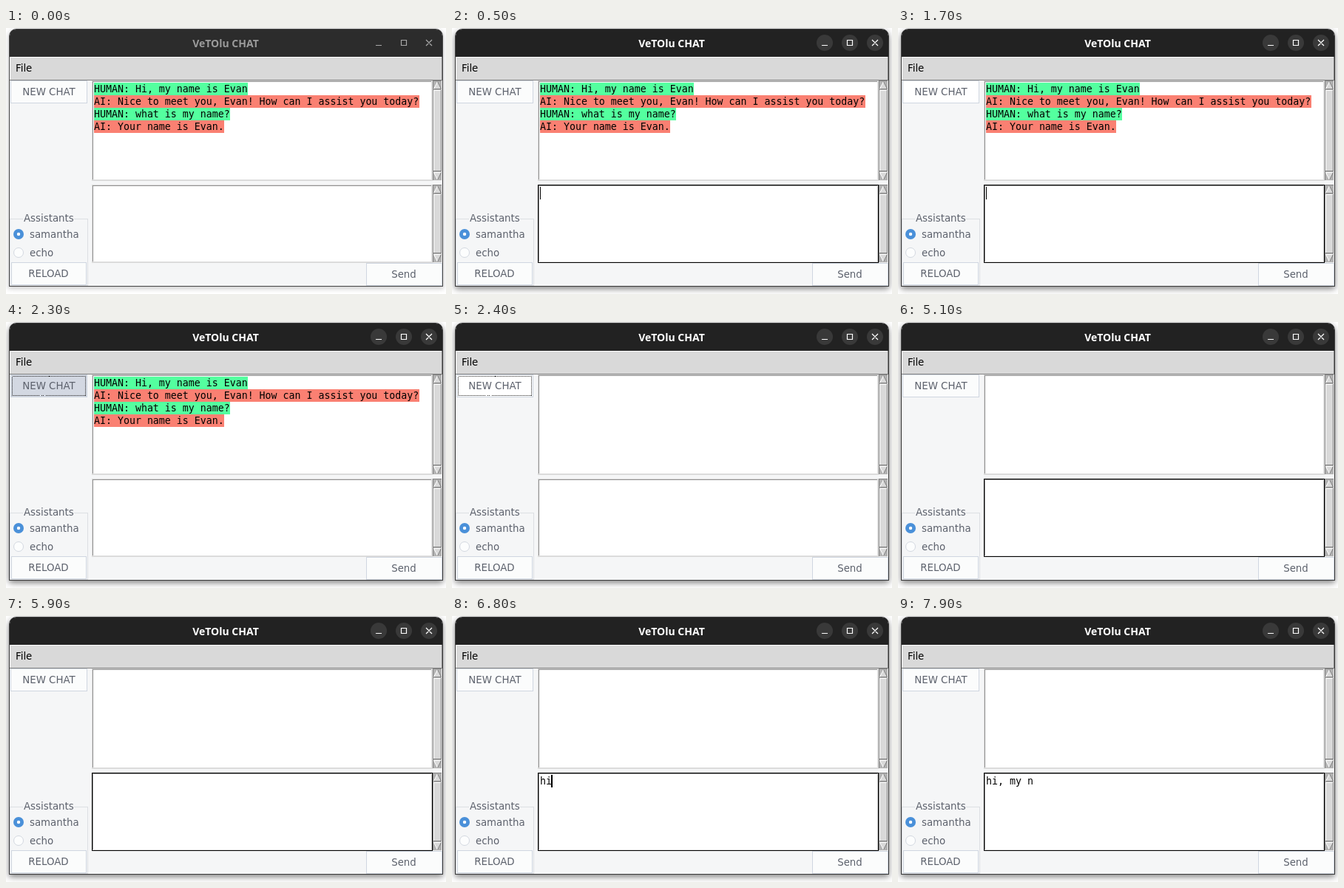
Write an HTML page that moves like this. It is 595 by 360 pixels and loops after 8000 ms.

```html
<!DOCTYPE html>
<html lang="en">
<head>
<meta charset="utf-8">
<title>Chat window</title>
<style>
  html, body { margin: 0; width: 100%; height: 100%; overflow: hidden; background: #fff; }
  #shadow { position: absolute; left: 5px; top: 2px; width: 585px; height: 347px; border-radius: 9px 9px 0 0;
    box-shadow: 0 0 0 1px #3a3a3a, 0 3px 9px 1px rgba(0,0,0,.5); }
  .idle #shadow { box-shadow: 0 0 0 1px #454545, 0 2px 6px 2px rgba(0,0,0,.2); }
  svg { position: absolute; left: 0; top: 0; display: block; }
  rect { shape-rendering: crispEdges; }
  text { font: 13.33px "DejaVu Sans", sans-serif; fill: #5c616c; white-space: pre; }
  .mono { font: 13.289px "DejaVu Sans Mono", monospace; fill: #000; }
  .mid { text-anchor: middle; }
  #bar { fill: #222; }
  #title { font: bold 14px "Noto Sans", "Open Sans", sans-serif; fill: #fff; }
  .disc { fill: #393939; }
  .icon { fill: none; stroke: #fff; stroke-width: 1.2; }
  .idle #bar { fill: #2c2c2c; }
  .idle #title { fill: #9b9b9b; }
  .idle .disc { fill: none; }
  .idle .icon { stroke: #a8a8a8; }
  .btn { fill: #fbfcfc; stroke: #cfd6e0; }
</style>
</head>
<body>
<div id="shadow"></div>
<svg id="stage" width="595" height="360" viewBox="0 0 595 360"></svg>
<script>
const LOOP = 8000, COL = 8, LINE = 17, LEFT = 119;
const $ = id => document.getElementById(id);

const rect = (x, y, w, h, fill, more = '') =>
  `<rect x="${x}" y="${y}" width="${w}" height="${h}" fill="${fill}" ${more}/>`;
const text = (x, y, str, more = '') => `<text x="${x}" y="${y}" ${more}>${str}</text>`;
const path = (d, more) => `<path d="${d}" ${more}/>`;

const button = (x, y, w, h, label, cx, base, id) =>
  `<rect id="${id}" class="btn" x="${x + .5}" y="${y + .5}" width="${w - 1}" height="${h - 1}" rx="1"/>` +
  text(cx, base, label, 'class="mid"');

// box with a bevel: light and dark edges around a fill
const bevel = (x, y, w, h, fill, topLeft, bottomRight) =>
  rect(x, y, w, h, bottomRight) + rect(x, y, w - 1, h - 1, topLeft) + rect(x + 1, y + 1, w - 2, h - 2, fill);

const textBox = (y, h, id) =>
  rect(116, y, 461, h, '#d9d9d9', `id="${id}"`) + bevel(117, y + 1, 459, h - 2, '#fff', '#929292', '#dedede');

function scrollbar(y, h) {
  const end = y + h;
  return bevel(577, y, 13, h, '#b3b3b3', '#828282', '#eee') +
    path(`M583.5 ${y + 1.5}L578.5 ${y + 11.5}H588.5Z`, 'fill="#d9d9d9"') +
    path(`M583.5 ${y + 1.5}L578.5 ${y + 11.5}`, 'stroke="#fff"') +
    path(`M578.5 ${y + 11.5}H588.5L583.5 ${y + 1.5}`, 'fill="none" stroke="#828282"') +
    bevel(578, y + 13, 11, h - 26, '#d9d9d9', '#fff', '#828282') +
    path(`M578.5 ${end - 11.5}H588.5L583.5 ${end - 1.5}Z`, 'fill="#d9d9d9"') +
    path(`M583.5 ${end - 1.5}L578.5 ${end - 11.5}H588.5`, 'fill="none" stroke="#fff"') +
    path(`M588.5 ${end - 11.5}L583.5 ${end - 1.5}`, 'stroke="#828282"');
}

const chat = [
  'HUMAN: Hi, my name is Evan',
  'AI: Nice to meet you, Evan! How can I assist you today?',
  'HUMAN: what is my name?',
  'AI: Your name is Evan.'
].map((str, i) => {
  const y = 74 + i * LINE;
  return rect(LEFT, y, str.length * COL, LINE, str[0] === 'H' ? '#54ff9f' : '#fa8072') +
    text(LEFT, y + 13, str, 'class="mono"');
}).join('');

$('stage').innerHTML =
  // title bar
  path('M5 39V11Q5 2 14 2H581Q590 2 590 11V39Z', 'id="bar"') +
  text(297, 25.5, 'VeTOlu CHAT', 'id="title" class="mid"') +
  [504, 538, 572].map(x => `<circle class="disc" cx="${x}" cy="20" r="11"/>`).join('') +
  path('M500 23.5H508M534.5 16.5H541.5V23.5H534.5ZM568 16L576 24M576 16L568 24', 'class="icon"') +
  // menu and body
  rect(5, 39, 585, 310, '#f5f6f7') +
  bevel(5, 39, 585, 32, '#d9d9d9', '#fff', '#828282') +
  text(13, 59, 'File', 'style="fill:#000"') +
  // side panel
  button(6, 71, 104, 31, 'NEW CHAT', 58, 91, 'newChat') +
  '<rect id="ring" x="8.5" y="73.5" width="99" height="26" fill="none" stroke="#222" stroke-dasharray="1 1"/>' +
  '<rect x="5.5" y="258.5" width="105" height="90" fill="none" stroke="#dcdfe3"/>' +
  rect(23, 256, 69, 5, '#f5f6f7') +
  text(24, 262, 'Assistants') +
  '<circle cx="17" cy="279" r="7" fill="#4a90d9"/><circle cx="17" cy="279" r="2.2" fill="#fff"/>' +
  '<circle cx="17" cy="304" r="6.5" fill="#fcfdfd" stroke="#d3d8e0"/>' +
  text(32, 284, 'samantha') + text(32, 309, 'echo') +
  button(7, 317, 102, 31, 'RELOAD', 57.5, 337, 'reload') +
  // text areas
  textBox(71, 136, 'logEdge') + scrollbar(71, 136) +
  textBox(212, 106, 'inputEdge') + scrollbar(212, 106) +
  `<g id="chat">${chat}</g>` +
  text(LEFT, 228, '', 'id="typed" class="mono"') +
  rect(LEFT, 215, 1, LINE, '#000', 'id="caret"') +
  button(487, 318, 103, 31, 'Send', 538, 338, 'send');

const MESSAGE = 'hi, my n';
const keys = [6600, 6800, 7100, 7200, 7300, 7600, 7700, 7900];
// caret switches between hidden and shown at each of these times
const blinks = [500, 1100, 1400, 2100, 3600, 4200, 4500, 5100, 5400, 5900, 6300, 6900, 7200, 7800];
const passed = (times, t) => times.filter(at => at <= t).length;
const show = (id, on) => $(id).setAttribute('visibility', on ? 'visible' : 'hidden');

function draw(t) {
  const between = (a, b) => t >= a && t < b;
  document.body.className = t < 500 ? 'idle' : '';
  show('chat', t < 2400);
  show('ring', between(2300, 3600));
  $('newChat').style.fill = between(2300, 2400) ? '#d3d8e2' : between(1700, 2600) ? '#fff' : '';
  $('inputEdge').setAttribute('fill', between(500, 2300) || t >= 3600 ? '#000' : '#d9d9d9');

  const count = passed(keys, t);
  $('typed').textContent = MESSAGE.slice(0, count);
  $('caret').setAttribute('x', LEFT + count * COL - (count ? 1 : 0));
  $('caret').setAttribute('width', count ? 2 : 1);
  show('caret', passed(blinks, t) % 2);
}

const start = performance.now();
function tick() {
  draw((performance.now() - start) % LOOP);
  requestAnimationFrame(tick);
}
tick();
</script>
</body>
</html>
```
